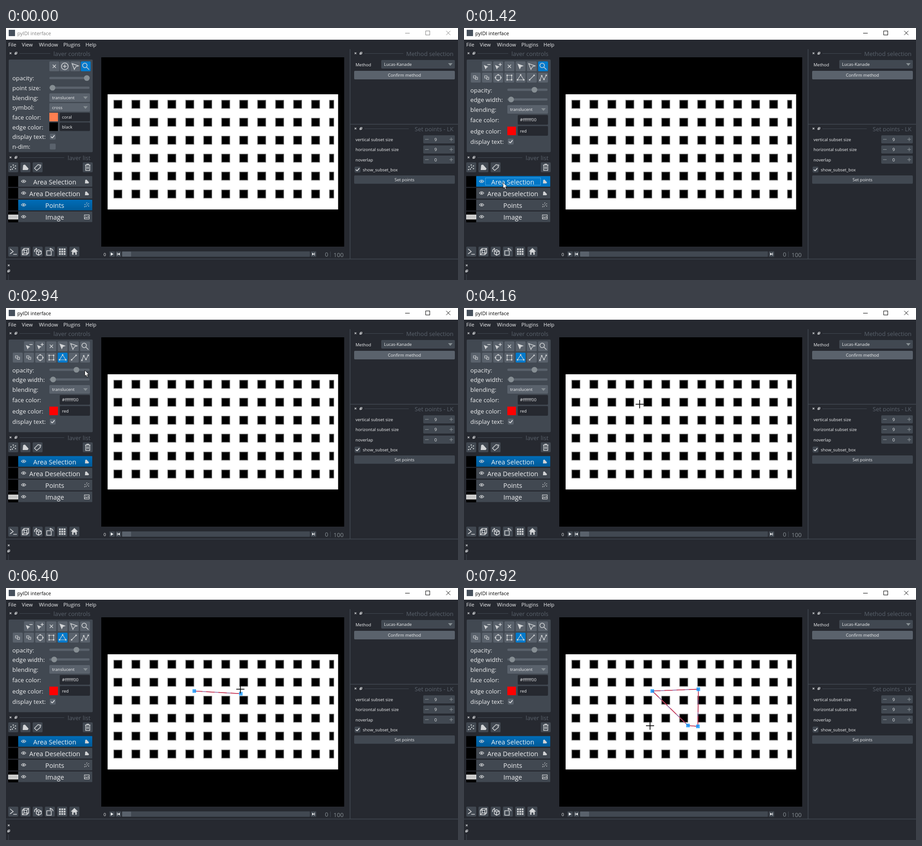
Write an HTML page with a canvas that moves like this. It is 1001x559 px and loops after 8000 ms.

```html
<!DOCTYPE html>
<html lang="en">
<head>
<meta charset="utf-8">
<title>pyIDI interface</title>
<style>
  html, body { margin: 0; width: 100%; height: 100%; overflow: hidden; background: #262930; }
  canvas { display: block; }
</style>
</head>
<body>
<canvas id="stage" width="1001" height="559"></canvas>
<script>
const ctx = document.getElementById('stage').getContext('2d');
const LOOP = 8000;
const BG = '#262930', FORE = '#414851', PRIMARY = '#5a626c', HOVER = '#6a7380',
      GREY = '#868e93', BLUE = '#007acc', TEXT = '#f0f1f2', ICON = '#d2d4d6';

// Event times in ms
const SELECT = 1420, TOOL_HOVER = 2320, TOOL_PICK = 2840,
      FIRST_POINT = 4580, DRAG = 5180, SECOND_POINT = 6600, THIRD_POINT = 7500;

// Pointer moves: start, end, number of steps, evenly spaced waypoints
const moves = [
  [200, 1000, 9, [[836, 529], [560, 440], [200, 360], [36, 337], [86, 342]]],
  [1720, 2420, 8, [[86, 339], [94, 235], [107, 136], [118, 116]]],
  [2540, 2640, 2, [[118, 112], [118, 109]]],
  [2840, 3460, 7, [[118, 110], [230, 165], [370, 210], [389, 213]]],
  [4160, 4380, 3, [[389, 213], [419, 230]]],
  [4580, 4680, 2, [[418, 229], [418, 229]]],
  [5180, 5880, 8, [[428, 236], [450, 247], [475, 258], [492, 265], [502, 269], [500, 273], [510, 273], [520, 272]]],
  [6000, 6800, 9, [[523, 268], [521, 245], [519, 224], [519, 224], [519, 235]]],
  [6900, 7620, 8, [[519, 260], [520, 292], [518, 307], [518, 309], [518, 308], [518, 307], [518, 307], [518, 307]]],
  [7720, 7920, 3, [[516, 306], [496, 305], [412, 305]]]
];

const icons = {
  close: 'M-3.5-3.5L3.5 3.5M3.5-3.5L-3.5 3.5',
  add: 'M7.5 0A7.5 7.5 0 1 1-7.5 0A7.5 7.5 0 1 1 7.5 0M-4 0H4M0-4V4',
  arrow: 'M-7-6L7-1L1 1L-2 7Z',
  zoom: 'M3-2A5 5 0 1 1-7-2A5 5 0 1 1 3-2M2 2L7.5 7.5',
  vertexArrow: 'M-6-3L4 1L0 3L-2 7Z',
  minus: 'M1-4H8',
  plus: 'M1-4H8M4.5-7.5V-.5',
  stack: 'M-5-4H0V1H-5ZM0-1H4V4H-1V1',
  ellipse: 'M6 0A6 6 0 1 1-6 0A6 6 0 1 1 6 0',
  rect: 'M-5-5H5V5H-5Z',
  polygon: 'M0-6L7 5H-7Z',
  line: 'M-5 5L5-5',
  path: 'M-7 6L-3-4L2 4L7-5',
  shape: 'M-5-5L-1-6L7 3L5 6H-6Z',
  tag: 'M-7 2L1-6L7-5L6 0L-2 7ZM3-3H4.5',
  trash: 'M-6-5H6M-2-5V-7H2V-5M-4.5-5V7H4.5V-5M-1.5-2V4M1.5-2V4',
  eye: 'M-5 0Q0-6 5 0Q0 6-5 0Z',
  picture: 'M-5.5-4.5H5.5V4.5H-5.5ZM-5 3L-2 0L0 2L3-1L5 2M-3-2H-2',
  console: 'M-7-6L0 0L-7 5M0 6H8',
  cube: 'M-7-3L-3-7H7V3L3 7H-7ZM-7-3H3V7M3-3L7-7M-3-7V3H7M-7 7L-3 3',
  roll: 'M-3-2L2-4L8-1V5L2 8L-3 5ZM-3-2L2 1L8-1M2 1V8M-7 1Q-8-6-2-6M-4-8L-2-6L-4-4',
  transpose: 'M-7-2H3V8H-7ZM0-6Q6-7 7-1M2-8L0-6L2-4',
  home: 'M-8 0L0-8L8 0H5V7H2V2H-2V7H-5V0Z'
};

function box(x, y, w, h, color, r = 1) {
  ctx.fillStyle = color;
  ctx.beginPath();
  ctx.roundRect(x, y, w, h, r);
  ctx.fill();
}

function text(str, x, y, size = 9.5, color = TEXT, align = 'left') {
  ctx.font = `${size}px "Open Sans", "Noto Sans", sans-serif`;
  ctx.fillStyle = color;
  ctx.textAlign = align;
  ctx.fillText(str, x, y);
}

function line(x1, y1, x2, y2, color = FORE, width = 1) {
  ctx.strokeStyle = color;
  ctx.lineWidth = width;
  ctx.beginPath();
  ctx.moveTo(x1, y1);
  ctx.lineTo(x2, y2);
  ctx.stroke();
}

function disc(x, y, r, color) {
  ctx.fillStyle = color;
  ctx.beginPath();
  ctx.arc(x, y, r, 0, 7);
  ctx.fill();
}

function icon(name, x, y, { color = ICON, fill = false, width = 1.5, scale = 1 } = {}) {
  const path = new Path2D(icons[name]);
  ctx.save();
  ctx.translate(x, y);
  ctx.scale(scale, scale);
  ctx.fillStyle = ctx.strokeStyle = color;
  ctx.lineWidth = width / scale;
  fill ? ctx.fill(path) : ctx.stroke(path);
  ctx.restore();
}

function dots(x, y, list, size = 3) {
  for (const [dx, dy] of list) box(x + dx - size / 2, y + dy - size / 2, size, size, ICON, 0);
}

function button(name, x, y, color = PRIMARY, options) {
  box(x - 11, y - 11, 22, 22, color, 2);
  if (name) icon(name, x, y, options);
}

function triangle(x, y, w, h, color) {
  ctx.fillStyle = color;
  ctx.beginPath();
  ctx.moveTo(x, y);
  ctx.lineTo(x + w, y + (h > 0 ? 0 : h));
  ctx.lineTo(h > 0 ? x + w / 2 : x + w, y + (h > 0 ? h : -h));
  if (h < 0) ctx.lineTo(x, y);
  ctx.fill();
}

function combo(x, y, w, label, color = PRIMARY) {
  box(x, y, w, 19, color, 2);
  text(label, x + 6, y + 13);
  triangle(x + w - 15, y + 7, 10, 6, GREY);
}

function check(x, y, on, color = PRIMARY) {
  box(x - 6.5, y - 6.5, 13, 13, color, 2);
  if (!on) return;
  line(x - 4, y, x - 1, y + 3, TEXT, 1.5);
  line(x - 1, y + 3, x + 4, y - 3, TEXT, 1.5);
}

function slider(y, knob) {
  box(96, y - 2.5, 89, 5, PRIMARY, 2);
  disc(knob, y, 6.3, GREY);
}

function colorField(y, h, swatch, label) {
  if (swatch) box(96, y + (h - 19) / 2, 19, 19, swatch, 0);
  box(119, y, 67, h, BG, 2);
  text(label, 124, y + h / 2 + 3.5);
}

const label = (str, y) => text(str, 14, y + 5, 13.3);

function floatIcon(x, y) {
  ctx.strokeStyle = ICON;
  ctx.lineWidth = 1;
  ctx.strokeRect(x - 1, y - 2.5, 3.5, 3.5);
  ctx.strokeRect(x - 2.5, y - .5, 3, 3);
}

function dockTitle(x, y, lineEnd, str, right) {
  icon('close', x, y, { scale: .55, width: 1.2 });
  floatIcon(x + 12, y);
  line(x + 20, y + .5, lineEnd, y + .5);
  ctx.save();
  ctx.beginPath();
  ctx.rect(x, y - 12, right - x + 2, 18.5);
  ctx.clip();
  text(str, right, y + 5.5, 13, PRIMARY, 'right');
  ctx.restore();
}

function drawWindow(active) {
  box(0, 0, 1001, 559, BG, 0);
  box(0, 0, 1001, 26, '#fff', 0);
  box(6, 4, 14, 14, '#46505c', 0);
  const ink = active ? '#000' : '#808080';
  text('pyIDI interface', 25, 15.5, 11.05, ink);
  line(884, 11.5, 894, 11.5, ink);
  ctx.strokeRect(929.5, 6.5, 9, 9);
  icon('close', 979.5, 11, { color: ink, width: 1, scale: 1.3 });
  [['File', 5], ['View', 35], ['Window', 73], ['Plugins', 127], ['Help', 176]]
    .forEach(([name, x]) => text(name, x, 41, 11.2));

  line(762, 47, 762, 512, FORE, 1.5);
  line(762, 213.5, 1001, 213.5, FORE, 1.5);
  line(0, 512.5, 1001, 512.5, FORE, 1.5);
  icon('close', 6, 526.5, { scale: .55, width: 1.2 });
  floatIcon(6, 539);
  line(5.5, 547, 5.5, 559);
}

function drawPointsControls() {
  ['close', 'add', 'arrow', 'zoom'].forEach((name, i) =>
    button(name, 107 + 23.2 * i, 85, name === 'zoom' ? BLUE : PRIMARY));
  label('opacity:', 111);
  slider(111, 179);
  label('point size:', 132.5);
  slider(132.5, 103);
  label('blending:', 154.5);
  combo(96, 145, 90, 'translucent');
  label('symbol:', 176);
  combo(96, 166.5, 90, 'cross');
  label('face color:', 198);
  colorField(188, 19, '#ff7f50', 'coral');
  label('edge color:', 219.5);
  colorField(209.5, 19, '#000', 'black');
  label('display text:', 241);
  check(103.5, 241, true);
  label('n-dim:', 263);
  check(103.5, 263, false);
}

function drawShapeControls(t) {
  const column = i => 26 + 24.85 * i;
  ['minus', 'plus', 'close', 'arrow', 'arrow', 'zoom'].forEach((name, i) => {
    const x = column(i + 1);
    button(name, x, 85, name === 'zoom' && t < TOOL_PICK ? BLUE : PRIMARY, { fill: i === 3 });
    if (i < 2) icon('vertexArrow', x - 1, 85, { fill: true });
  });
  const nodes = {
    ellipse: [[0, -6], [6, 0], [0, 6], [-6, 0]],
    rect: [[-5, -5], [5, -5], [5, 5], [-5, 5]],
    polygon: [[0, -6], [7, 5], [-7, 5]],
    line: [[-5, 5], [5, -5]],
    path: [[-7, 6], [-3, -4], [2, 4], [7, -5]]
  };
  ['stack', 'stack', 'ellipse', 'rect', 'polygon', 'line', 'path'].forEach((name, i) => {
    let color = PRIMARY;
    if (name === 'polygon') color = t >= TOOL_PICK ? BLUE : t >= TOOL_HOVER ? HOVER : PRIMARY;
    button(name, column(i), 110, color, { width: 1.2 });
    dots(column(i), 110, nodes[name] || []);
  });
  label('opacity:', 137.5);
  slider(137, 156);
  label('edge width:', 159);
  slider(158.5, t < DRAG ? 104.3 : 106.7);
  label('blending:', 181);
  combo(96, 171, 90, 'translucent');
  label('face color:', 204);
  colorField(193, 21.5, null, '#ffffff00');
  label('edge color:', 228.5);
  colorField(217.5, 21.5, '#f00', 'red');
  label('display text:', 252);
  check(103.5, 252, true);
}

const scatter = [[-5, -1], [-2, 4], [0, -5], [1, 0], [5, -3], [5, 3], [-6, 5]];

function drawLayerList(t) {
  dockTitle(10, 287, 129, 'layer list', 187);
  button(null, 16, 309, FORE);
  dots(16, 309, scatter, 2.4);
  button('shape', 43, 309, FORE, { fill: true });
  button('tag', 70, 309, FORE);
  button('trash', 181, 309, FORE);

  const selected = t < SELECT ? 2 : 0, focused = t >= SELECT && t < TOOL_PICK;
  ['Area Selection', 'Area Deselection', 'Points', 'Image'].forEach((name, i) => {
    const y = 328.5 + 26.2 * i;
    box(5, y, 22, 24, '#000', 0);
    let color = FORE;
    if (i === selected) {
      color = ctx.createLinearGradient(0, y, 0, y + 24);
      color.addColorStop(0, focused ? '#007acc' : '#006db8');
      color.addColorStop(1, focused ? '#0074c2' : '#005a98');
    }
    box(27, y, 164, 23.5, color, 1);
    icon('eye', 39, y + 11.5, { width: 1.2 });
    disc(39, y + 11.5, 1.7, ICON);
    if (i === selected && focused) {
      ctx.strokeStyle = '#4aa5e0';
      ctx.lineWidth = 1;
      ctx.strokeRect(47.5, 332.5, 122, 16);
    }
    text(name, 108, y + 18.3, 14.4, TEXT, 'center');
    if (i === 2) dots(179, y + 11.5, scatter.map(([a, b]) => [a * .8, b * .8]), 1.7);
    else icon(i < 2 ? 'shape' : 'picture', 179, y + 12, { fill: i < 2, scale: i < 2 ? .7 : 1, width: 1.1 });
  });

  box(5, 414, 22, 10.5, '#fff', 0);
  for (let i = 0; i < 60; i++)
    box(6 + (i % 12) * 1.72, 415 + Math.floor(i / 12) * 1.8, .8, .8, '#000', 0);

  ['console', 'cube', 'roll', 'transpose', null, 'home'].forEach((name, i) =>
    button(name, 16 + 27.1 * i, 496, FORE, { fill: name === 'home', width: 1.6 }));
  for (let i = 0; i < 9; i++)
    box(117.5 + (i % 3) * 5.2, 489 + Math.floor(i / 3) * 5.2, 3.8, 3.8, ICON, 0);
}

function drawViewer() {
  box(211, 65, 538, 420, '#000', 0);
  box(225, 147, 510.5, 255.5, '#fff', 0);
  for (let row = 0; row < 6; row++) {
    for (let col = 0; col < 13; col++) {
      const x = 237.8 + 39.8 * col, y = 159.3 + 39.8 * row, w = col < 12 ? 20 : 11.5;
      box(x, y, w, 20, '#b0b0b0', 1);
      box(x + .8, y + .8, w - 1.6, 18.4, '#555', 0);
      box(x + 1.8, y + 1.8, w - 3.6, 16.4, '#000', 0);
    }
  }
  text('0', 216, 505.5, 9.5);
  for (const x of [229, 243, 675]) box(x, 495.5, 12, 12, FORE, 1);
  const glyphs = new Path2D('M232 498L238 501.5L232 505ZM246 498.5H247.2V504.5H246ZM252 498.5V504.5L247.5 501.5ZM678 498.5V504.5L682.5 501.5ZM682.8 498.5H684V504.5H682.8Z');
  ctx.fillStyle = TEXT;
  ctx.fill(glyphs);
  box(257, 495.5, 416, 12, FORE, 1);
  box(257, 496, 20, 11, PRIMARY, 1);
  text('0', 710, 507, 13, GREY, 'center');
  line(718.5, 496, 718.5, 508);
  text('100', 736.5, 507.5, 13, GREY, 'center');
}

function drawMethodPanel() {
  dockTitle(774, 56, 880, 'Method selection', 991);
  text('Method', 774, 84.5);
  combo(831, 71, 163, 'Lucas-Kanade', FORE);
  box(771, 95, 223, 19, PRIMARY, 2);
  text('Confirm method', 882.5, 108, 9.5, TEXT, 'center');

  dockTitle(774, 223, 892, 'Set points - LK', 991);
  [['vertical subset size', 9], ['horizontal subset size', 9], ['noverlap', 0]].forEach(([name, value], i) => {
    const y = 247 + 22.5 * i;
    text(name, 774, y + 3.5);
    box(924, y - 9, 70, 18, FORE, 2);
    text(value, 951.5, y + 3.5, 9.5, TEXT, 'center');
    line(928, y, 936, y, GREY, 1.2);
    line(982, y, 990, y, GREY, 1.2);
    line(986, y - 4, 986, y + 4, GREY, 1.2);
  });
  check(778.5, 314, true, FORE);
  text('show_subset_box', 790, 317.5);
  box(771, 327, 223, 18.5, FORE, 2);
  text('Set points', 882.5, 340, 9.5, TEXT, 'center');
}

function pointerAt(t) {
  const move = moves.findLast(([start]) => t >= start);
  if (!move) return null;
  const [start, end, steps, path] = move;
  const step = Math.min(steps - 1, Math.floor((t - start) / (end - start) * (steps - 1) + .1));
  const place = step / (steps - 1) * (path.length - 1);
  const i = Math.min(Math.floor(place), path.length - 2), f = place - i;
  return path[i].map((v, k) => v + (path[i + 1][k] - v) * f);
}

function drawPolygon(t) {
  if (t < FIRST_POINT) return;
  const corners = [[417, 228.5]];
  if (t >= SECOND_POINT) corners.push([519, 224.5]);
  if (t >= THIRD_POINT) corners.push([518, 307]);
  if (t >= DRAG) corners.push(pointerAt(t - 100)); // the loose corner trails the pointer

  const outline = new Path2D(), handles = new Path2D();
  corners.forEach(([x, y], i) => {
    i ? outline.lineTo(x, y) : outline.moveTo(x, y);
    handles.rect(x - 4, y - 4, 8, 8);
  });
  outline.closePath();
  ctx.lineWidth = 1.7;
  ctx.strokeStyle = '#8d5c98';
  ctx.stroke(outline);
  ctx.setLineDash([18, 9]);
  ctx.strokeStyle = '#d0405a';
  ctx.stroke(outline);
  ctx.setLineDash([]);
  ctx.fillStyle = 'rgba(0, 145, 255, .74)';
  ctx.fill(handles);
}

function drawPointer(t) {
  const spot = pointerAt(t);
  if (!spot) return;
  const [x, y] = spot;
  if (x > 211 && t >= TOOL_PICK) {
    line(x - 9, y + .5, x + 9, y + .5, '#000', 1.7);
    line(x, y - 9, x, y + 9.5, '#000', 1.7);
    return;
  }
  const arrow = new Path2D('M.5.5V13.5L3.3 11L5.4 15.6L7.6 14.7L5.6 10.2H9.6Z');
  ctx.save();
  ctx.translate(x, y);
  ctx.fillStyle = '#fff';
  ctx.strokeStyle = '#000';
  ctx.lineWidth = .8;
  ctx.fill(arrow);
  ctx.stroke(arrow);
  ctx.restore();
}

function draw(now) {
  const t = now % LOOP;
  drawWindow(t >= SELECT);
  dockTitle(10, 56, 98, 'layer controls', 187);
  box(6, 70, 186, 205.5, FORE, 2);
  t < SELECT ? drawPointsControls() : drawShapeControls(t);
  drawLayerList(t);
  drawViewer();
  drawMethodPanel();
  drawPolygon(t);
  drawPointer(t);
  requestAnimationFrame(draw);
}
requestAnimationFrame(draw);
</script>
</body>
</html>
```
